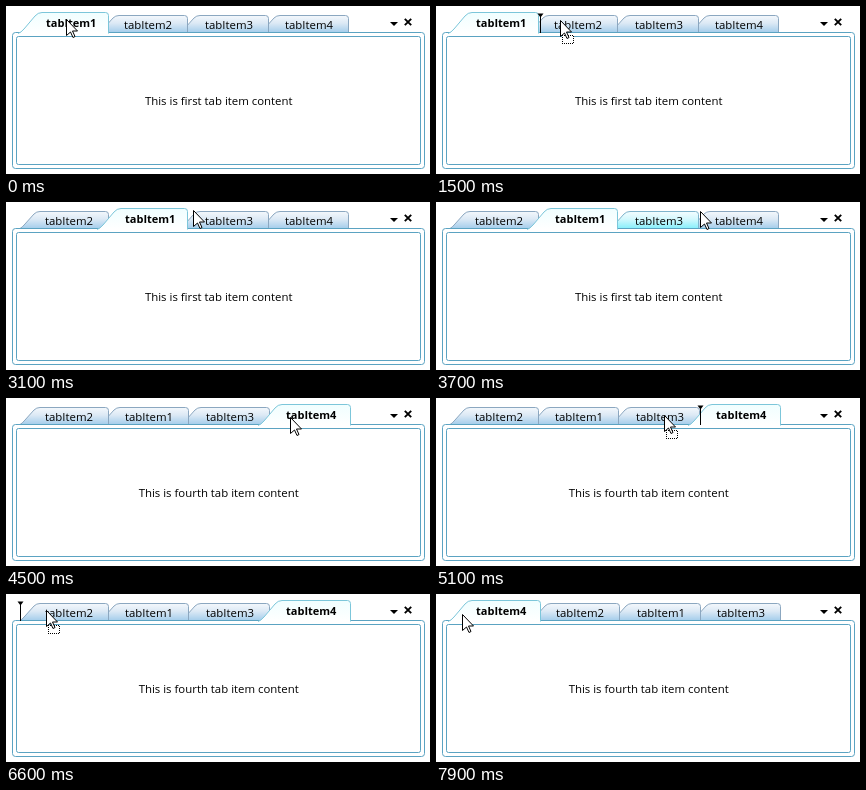
These frames come from a looping animation (424x168 px, 8000 ms). An HTML page:

```html
<!DOCTYPE html>
<html lang="en">
<head>
<meta charset="utf-8">
<title>Reordering tabs</title>
<style>
  html, body { margin: 0; width: 100%; height: 100%; overflow: hidden; background: #fff; }
  svg { display: block; width: 424px; height: 168px; }
  text { font: 11.4px "Open Sans", "Noto Sans", sans-serif; fill: #000; }
  .tab path { fill: url(#idle); stroke: #8ba7c0; }
  .tab.hover path { fill: url(#hover); stroke: #7fb4cc; }
  .tab.on path { fill: url(#on); stroke: #7cc6da; }
  .tab.on text { font-size: 11px; font-weight: 700; }
  .frame { fill: #fff; stroke: #5ba3c2; }
</style>
</head>
<body>
<svg viewBox="0 0 424 168">
  <defs>
    <linearGradient id="idle" x2="0" y2="1">
      <stop stop-color="#f4f8fc"/><stop offset=".45" stop-color="#dce9f5"/><stop offset="1" stop-color="#a4cdeb"/>
    </linearGradient>
    <linearGradient id="hover" x2="0" y2="1">
      <stop stop-color="#f4fdff"/><stop offset=".45" stop-color="#d3f8fd"/><stop offset="1" stop-color="#86effb"/>
    </linearGradient>
    <linearGradient id="on" x2="0" y2="1">
      <stop stop-color="#f0feff"/><stop offset="1" stop-color="#fff"/>
    </linearGradient>
  </defs>

  <g id="idleTabs"></g>
  <rect class="frame" x="6.5" y="26.5" width="412" height="136" rx="3"/>
  <g id="activeTab"></g>
  <rect class="frame" x="10.5" y="30.5" width="404" height="128" rx="2"/>
  <text id="content" x="212.7" y="99" text-anchor="middle"></text>

  <path d="M384 16h8l-4 4z"/>
  <path d="M398.8 12.8l6.4 6.4m0-6.4l-6.4 6.4" stroke="#000" stroke-width="1.9"/>

  <g id="marker">
    <path d="M-2.5 7.5h6L.5 11.5z"/>
    <path d="M.5 8V27" stroke="#000"/>
  </g>
  <g id="cursor">
    <g id="ghost" shape-rendering="crispEdges">
      <rect x="2" y="15" width="12" height="9" fill="#fff"/>
      <rect x="2.5" y="15.5" width="11" height="8" fill="none" stroke="#000"
        stroke-dasharray="1 1" stroke-dashoffset=".5"/>
    </g>
    <path d="M.5 .5V16.5L4.5 13L7 18.5L9 17.5L6.5 12H11.5Z" fill="#fff" stroke="#000"/>
  </g>
</svg>
<script>
const LOOP = 8000, STEP = 100, GLIDE = 400;
const $ = id => document.getElementById(id);

// Where the pointer arrives: time, x, y. It rests, then glides there.
const stops = [
  [0, 60, 13],
  [1700, 187, 14], [2100, 147, 9], [2300, 165, 15], [2900, 187, 8],
  [3700, 264, 9], [4100, 284, 19],
  [4900, 165, 17], [5300, 290, 17], [5700, 122, 14], [6100, 64, 14],
  [6600, 40, 16], [7500, 18, 21], [7900, 26, 20]
];

const within = (t, a, b) => t >= a && t < b;
const place = (el, x, y) => el.setAttribute('transform', `translate(${x} ${y})`);
const show = (el, on) => el.style.display = on ? '' : 'none';

function pointerAt(t) {
  const i = stops.findLastIndex(s => s[0] <= t);
  const [t0, x0, y0] = stops[i];
  const [t1, x1, y1] = stops[i + 1] || [LOOP, x0, y0];
  const k = Math.max(0, 1 - (t1 - t) / Math.min(GLIDE, t1 - t0));
  return [Math.round(x0 + (x1 - x0) * k), Math.round(y0 + (y1 - y0) * k)];
}

function tab(x, step, label, kind) {
  const on = kind === 'on';
  const top = on ? 6.5 : 9.5;
  const foot = on ? 27.5 : 26.5;
  const right = Math.floor(step - 17) + .5;
  const slope = on
    ? 'Q-25 26.5 -22 23L-11 10Q-8 6.5 -4 6.5'
    : 'Q-23 25.5 -20 22L-11 12Q-8.5 9.5 -5 9.5';
  const d = `M${on ? -28 : -25} ${foot}${slope}H${right - 3}Q${right} ${top} ${right} ${top + 3}V${foot}`;
  return `<g class="tab ${kind}" transform="translate(${x} 0)">` +
    `<path d="${d}"/><text y="${on ? 21 : 23}">tabItem${label}</text></g>`;
}

let drawn = '';
function drawTabs(order, on, hover) {
  const key = order + on + hover;
  if (key === drawn) return;
  drawn = key;
  let idle = '', active = '', pos = 39;
  [...order].forEach((label, i) => {
    const selected = label === on;
    // Tab width follows its label, and bold digits differ in width.
    const step = !selected ? 80.3 : label === '1' ? 79.3 : 81.3;
    const x = Math.round(pos + (selected && i === 0 ? 1 : 0));
    if (selected) active = tab(x, step, label, 'on');
    // Earlier tabs overlap later ones.
    else idle = tab(x, step, label, label === hover ? 'hover' : '') + idle;
    pos += step;
  });
  $('idleTabs').innerHTML = idle;
  $('activeTab').innerHTML = active;
  $('content').textContent = `This is ${on === '1' ? 'first' : 'fourth'} tab item content`;
}

function draw(t) {
  const order = t < 3100 ? '1234' : t < 7900 ? '2134' : '4213';
  const on = t < 4000 ? '1' : '4';
  const hover = within(t, 3400, 3800) ? '3' : within(t, 3800, 4000) ? '4' : '';
  drawTabs(order, on, hover);

  const [x, y] = pointerAt(t);
  const dragging = within(t, 1400, 3100) || within(t, 4600, 7900);
  place($('cursor'), x, y);
  show($('ghost'), dragging);

  // The drop marker snaps to the nearest gap between tabs.
  const gap = Math.min(3, Math.max(0, Math.floor((x + 23) / 80)));
  place($('marker'), gap ? 24 + gap * 80 : 14, 0);
  show($('marker'), dragging);
}

const start = performance.now();
function frame() {
  const t = (performance.now() - start) % LOOP;
  draw(Math.floor(t / STEP) * STEP);
  requestAnimationFrame(frame);
}
frame();
</script>
</body>
</html>
```
